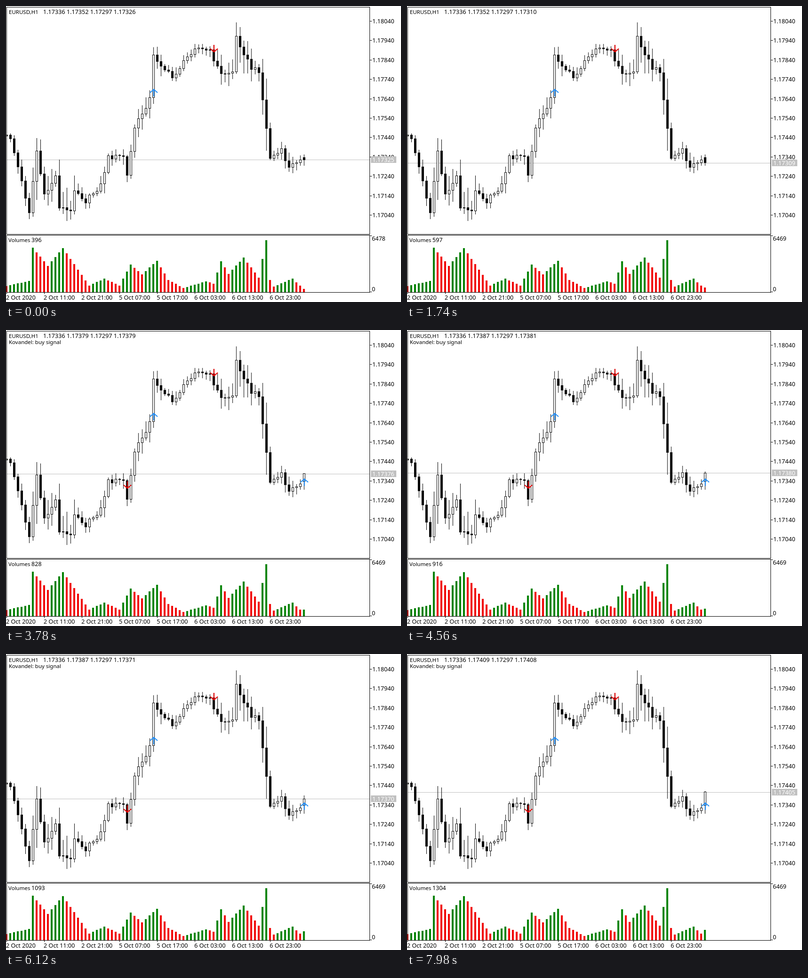
Recreate the animation shown at these times as an HTML page with a canvas. Size 840x632 px, loop 8 s.

```html
<!DOCTYPE html>
<html lang="en">
<head>
<meta charset="utf-8">
<title>Price chart</title>
<style>
html, body { margin: 0; width: 100%; height: 100%; overflow: hidden; background: #fff; }
canvas { display: block; }
</style>
</head>
<body>
<canvas id="chart" width="840" height="632"></canvas>
<script>
const ctx = document.getElementById('chart').getContext('2d');
const LOOP = 8000, TICK = 30, SIGNAL_TIME = 3500, RESCALE_TIME = 870;
const OPEN = 17336, LOW = 17297, FIRST_HIGH = 17352;
const LAST = 79, BASE = 611;
const DIGITS = '12.6px "Noto Sans", sans-serif';
const WORDS = '11.5px "Noto Sans", sans-serif';
const BLUE = '#1e90ff', RED = '#f00000', GREEN = '#008000', GRAY = '#c0c0c0';

// Turning points: [candle, y] and [candle, bar height]
const trend = [[0, 278], [1, 281], [6, 438], [8, 309], [10, 406], [13, 363], [14, 428],
  [17, 440], [18, 389], [21, 416], [25, 382], [27, 322], [31, 320], [32, 362], [34, 259],
  [38, 198], [39, 106], [44, 153], [50, 87], [54, 97], [57, 146], [60, 140], [61, 66],
  [65, 133], [67, 137], [70, 324], [73, 309], [75, 346], [78, 323]];
const activity = [[0, 13], [6, 24], [7, 95], [11, 56], [15, 94], [22, 14], [26, 29],
  [30, 14], [33, 59], [36, 38], [40, 67], [43, 26], [47, 9], [53, 23], [55, 18], [57, 66],
  [59, 39], [63, 74], [67, 31], [69, 111], [70, 26], [71, 12], [76, 29], [78, 13.7]];
// [time, value]
const pricePath = [[0, 17326], [1740, 17310], [3000, 17361], [4100, 17387], [4560, 17381],
  [5430, 17364], [6780, 17378], [7900, 17409], [8000, 17408]];
const volumePath = [[0, 396], [1740, 597], [LOOP, 1306]];

function along(points, x) {
  const next = Math.max(1, points.findIndex(p => p[0] >= x));
  const [x0, y0] = points[next - 1], [x1, y1] = points[next];
  return y0 + (y1 - y0) * (x - x0) / (x1 - x0);
}

function random(i, seed) {
  const n = Math.sin(i * 12.9898 + seed * 78.233) * 43758.5453;
  return n - Math.floor(n);
}

const candleX = i => 1.5 + 8.0065 * i;
const priceY = points => Math.round(32 + (18040 - points) * 0.414);
const priceText = points => (1 + points / 1e5).toFixed(5);

// Each candle opens at the previous close; busier hours have longer wicks.
const candles = [];
for (let i = 0, open = 277; i < LAST; i++) {
  const close = Math.round(along(trend, i) + 10 * (random(i, 1) - 0.5));
  const volume = along(activity, i);
  const wick = seed => Math.round(2 + random(i, seed) * (5 + 0.45 * volume));
  const high = Math.min(open, close) - wick(2);
  const low = Math.max(open, close) + wick(3);
  candles.push({ open, close, high, low, volume });
  open = close;
}

function box(x, y, w, h, color = '#000') {
  ctx.fillStyle = color;
  ctx.fillRect(x, y, w, h);
}

function label(text, x, y, font = DIGITS, color = '#000') {
  ctx.font = font;
  ctx.fillStyle = color;
  ctx.fillText(text, x, y);
}

function drawCandle(i, { open, close, high, low }) {
  const x = candleX(i), top = Math.min(open, close), height = Math.abs(open - close) + 1;
  box(x - 0.5, high, 1, low - high + 1);
  box(x - 2.5, top, 5, height);
  if (close < open && height > 2) box(x - 1.5, top + 1, 3, height - 2, '#fff');
}

function drawVolume(i, height, previous) {
  const h = Math.round(height);
  box(candleX(i) - 2.5, BASE - h, 4, h, height > previous ? GREEN : RED);
}

// dir: 1 points up, -1 points down
function arrow(i, tipY, dir, color) {
  const x = candleX(i) + 0.5;
  ctx.strokeStyle = color;
  ctx.lineWidth = 2;
  ctx.beginPath();
  ctx.moveTo(x - 8, tipY + 8 * dir);
  ctx.lineTo(x, tipY + dir);
  ctx.lineTo(x + 8, tipY + 8 * dir);
  ctx.moveTo(x, tipY + dir);
  ctx.lineTo(x, tipY + 16 * dir);
  ctx.stroke();
}

function marketAt(t) {
  const price = Math.round(along(pricePath, t));
  const passed = pricePath.filter(p => p[0] <= t).map(p => p[1]);
  const high = Math.max(FIRST_HIGH, price, ...passed);
  const quote = price - (price >= high - 1 ? 3 : 1);
  return { price, high, quote, volume: Math.round(along(volumePath, t)) };
}

function drawAxes() {
  for (const y of [2, 487, 489, BASE]) box(1, y, 773, 1);
  for (const x of [1, 773]) {
    box(x, 2, 1, 486);
    box(x, 489, 1, 123);
  }
  for (let points = 18040; points >= 17040; points -= 100) {
    const y = priceY(points);
    box(774, y, 4, 1);
    label(priceText(points), 779, y + 4.5);
  }
  box(774, 490, 4, 1);
  box(774, 610, 4, 1);

  // One label every ten trading hours, skipping the weekend
  for (let i = 0; i < 8; i++) {
    const hour = 1 + 10 * i, day = [2, 5, 6][Math.floor(hour / 24)];
    const time = i ? String(hour % 24).padStart(2, '0') + ':00' : '2020';
    box(candleX(10 * i) - 0.5, BASE + 1, 1, 3);
    label(`${day} Oct ${time}`, 80.1 * i, 627);
  }
}

function draw(t) {
  const { price, high, quote, volume } = marketAt(t);
  const scale = t < RESCALE_TIME ? 6478 : 6469;
  const quoteY = priceY(quote);

  box(0, 0, 840, 632, '#fff');
  box(2, quoteY, 771, 1, GRAY);
  candles.forEach((candle, i) => {
    drawCandle(i, candle);
    drawVolume(i, candle.volume, i ? candles[i - 1].volume : Infinity);
  });
  drawCandle(LAST, {
    open: priceY(OPEN), close: priceY(price), high: priceY(high), low: priceY(LOW)
  });
  drawVolume(LAST, volume * 111 / scale, candles[LAST - 1].volume);

  arrow(39, 177, 1, BLUE);
  arrow(55, 99, -1, RED);
  if (t >= SIGNAL_TIME) {
    arrow(LAST, 317, 1, BLUE);
    arrow(32, 339, -1, RED);
    label('Kovandel: buy signal', 6, 30, WORDS);
  }

  drawAxes();
  box(776, quoteY - 7, 54, 14, GRAY);
  label(priceText(quote), 779, quoteY + 4.5, DIGITS, '#fff');
  label('EURUSD,H1', 6, 16.5, WORDS);
  [OPEN, high, LOW, price].forEach((p, i) => label(priceText(p), 79 + 50 * i, 16.5));
  label('Volumes', 5, 504, WORDS);
  label(volume, 54, 504);
  label(scale, 778, 501);
  label('0', 778, 609);
}

function animate(now) {
  const t = now % LOOP;
  draw(t - t % TICK);
  requestAnimationFrame(animate);
}
requestAnimationFrame(animate);
</script>
</body>
</html>
```
